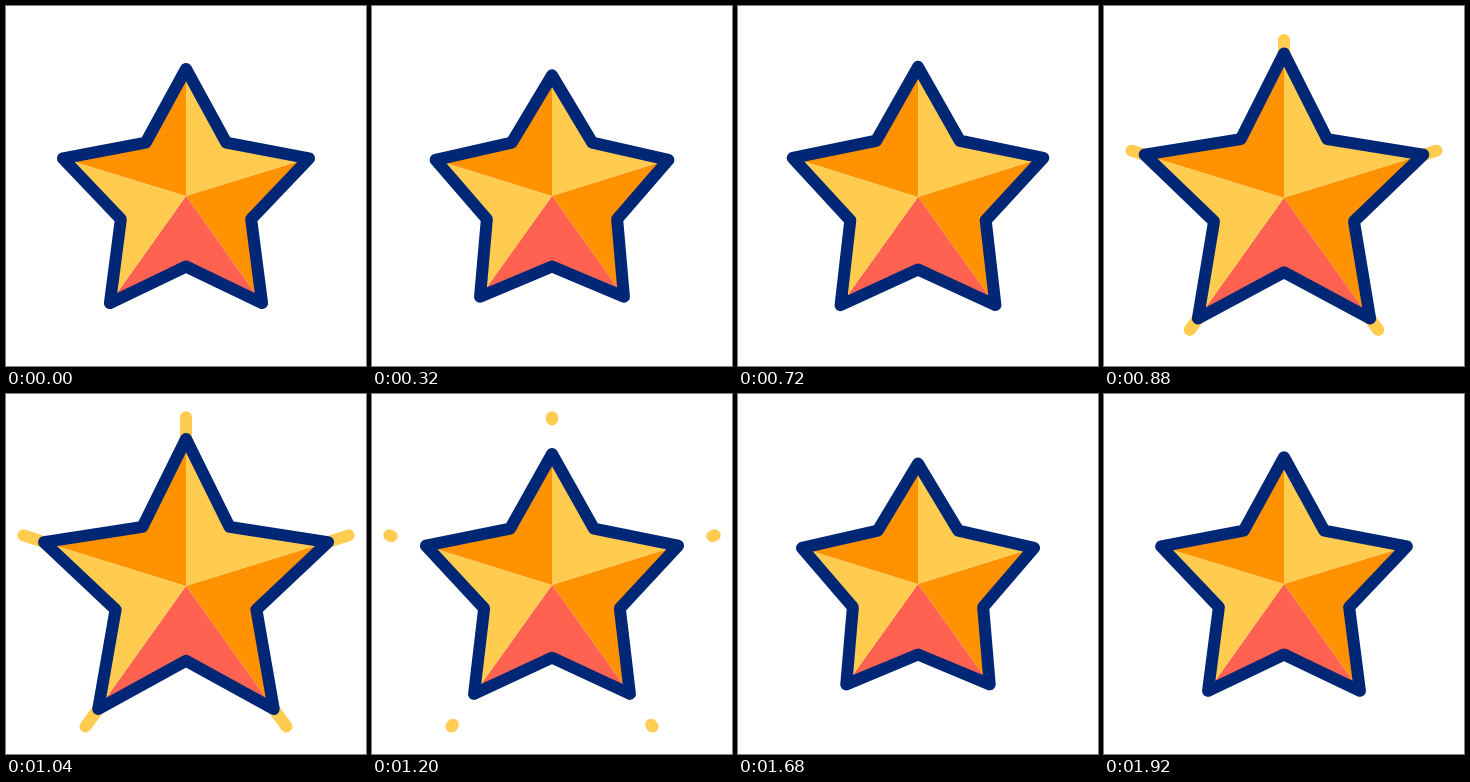
Animation, 360 px wide and 360 px high, one loop 2000 ms. Source, as an HTML page:

```html
<!DOCTYPE html>
<html lang="en">
<head>
<meta charset="utf-8">
<title>Star</title>
<style>
  html, body { margin: 0; width: 100%; height: 100%; overflow: hidden; background: #fff; }
  svg { display: block; width: 100%; height: 100%; }
</style>
</head>
<body>
<svg viewBox="0 0 360 360" stroke-width="12" stroke-linecap="round" stroke-linejoin="round">
  <path id="rays" fill="none" stroke="#ffcc50"/>
  <g id="facets" stroke="none"></g>
  <path id="outline" fill="none" stroke="#002776"/>
</svg>
<script>
const LOOP = 2000, STEP = 40;
const REST = .42; // tip spread at rest, between contracted (0) and expanded (1)
const YELLOW = '#ffcc50', ORANGE = '#ff9200', CORAL = '#ff6250';

const lerp = (a, b, t) => a + (b - a) * t;

// Five corners of a regular pentagon, clockwise, first one `turn` fifths from the top
function ring(cy, radius, turn = 0) {
  return Array.from({ length: 5 }, (_, i) => {
    const a = (i + turn) * Math.PI * 2 / 5;
    return [180 + radius * Math.sin(a), cy - radius * Math.cos(a)];
  });
}

const line = pts => 'M' + pts.map(p => p.map(v => v.toFixed(2)).join(' ')).join('L');
const shape = pts => line(pts) + 'Z';

// Cubic bezier (.35, 0, .22, 1), solved by bisection
function ease(x) {
  if (x <= 0) return 0;
  if (x >= 1) return 1;
  let lo = 0, hi = 1, s = .5;
  for (let i = 0; i < 24; i++) {
    s = (lo + hi) / 2;
    const r = 1 - s;
    if (3 * .35 * s * r * r + 3 * .22 * s * s * r + s * s * s < x) lo = s;
    else hi = s;
  }
  return s * s * (3 - 2 * s);
}
const between = (t, from, to) => ease((t - from) / (to - from));

const rays = document.getElementById('rays');
const outline = document.getElementById('outline');
const group = document.getElementById('facets');
const facets = [YELLOW, ORANGE, CORAL, YELLOW, ORANGE].map(fill => {
  const el = document.createElementNS('http://www.w3.org/2000/svg', 'path');
  el.setAttribute('fill', fill);
  return group.appendChild(el);
});

function draw(t) {
  // Shrink, burst, shrink again, settle
  const burst = between(t, 560, 1040) - between(t, 1040, 1520);
  const calm = 1 - between(t, 200, 560) + between(t, 1520, 2000);
  const spread = burst + REST * calm;

  const tips = ring(lerp(191, 194.2, spread), lerp(115, 149.3, spread));
  const notches = ring(lerp(192, 192.7, burst), lerp(68.5, 74, burst), .5);
  const center = [180, lerp(190, 192, burst)];
  facets.forEach((el, i) =>
    el.setAttribute('d', shape([center, tips[i], notches[i], tips[(i + 1) % 5]])));
  outline.setAttribute('d', shape(tips.flatMap((p, i) => [p, notches[i]])));

  // Rays shoot out from behind the tips, then their tails catch up
  const head = between(t, 720, 1060), tail = between(t, 900, 1320);
  const inner = ring(194.2, lerp(130, 171, tail));
  const outer = ring(194.2, lerp(130, 171, head));
  rays.setAttribute('d', head > tail ? inner.map((p, i) => line([p, outer[i]])).join('') : '');
}

const start = performance.now();
function tick() {
  const t = (performance.now() - start) % LOOP;
  draw(Math.floor(t / STEP) * STEP);
  requestAnimationFrame(tick);
}
tick();
</script>
</body>
</html>
```
